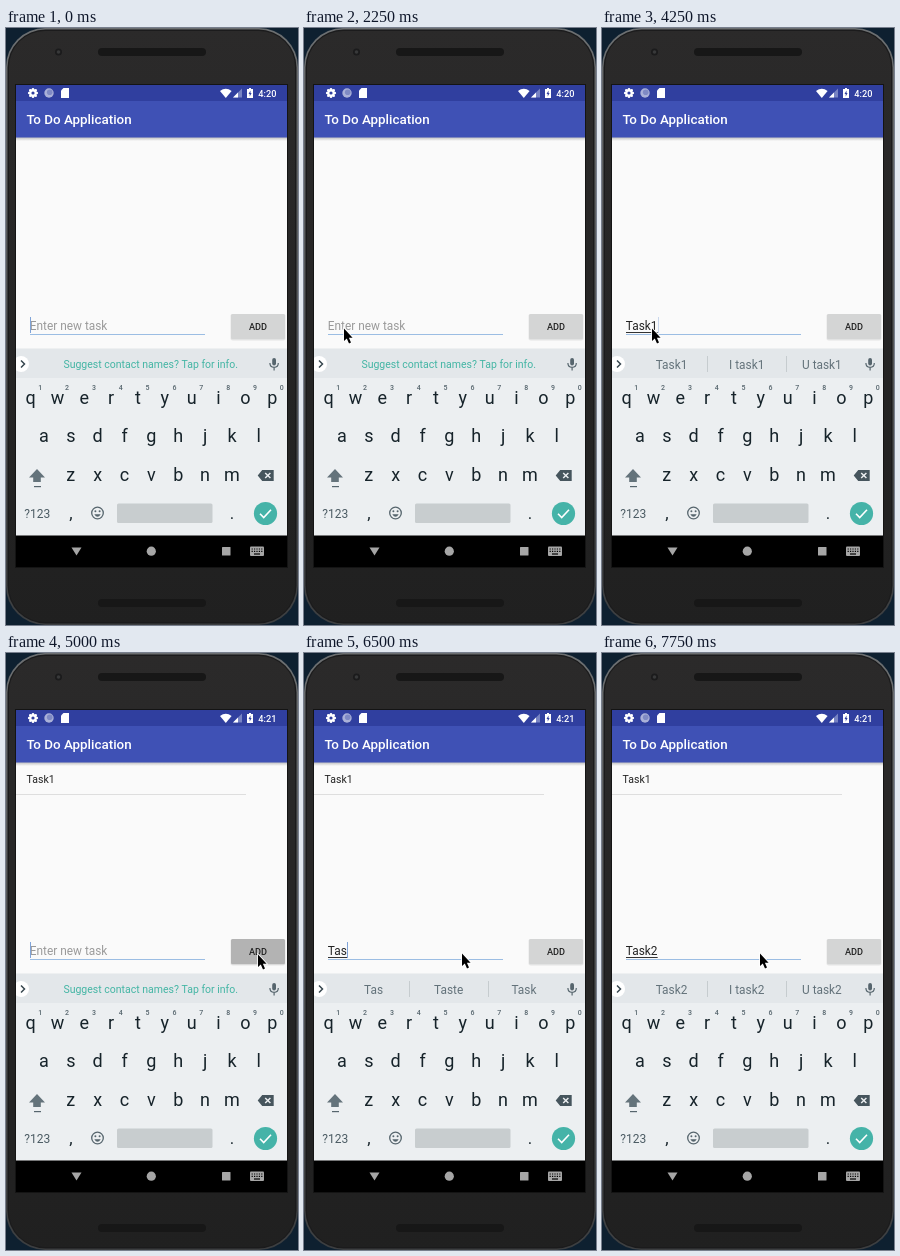
Recreate the animation shown at these times as an HTML page with a canvas. Size 292x597 px, loop 8 s.

```html
<!DOCTYPE html>
<html lang="en">
<head>
<meta charset="utf-8">
<title>To Do Application</title>
<style>
  html, body { margin: 0; width: 100%; height: 100%; overflow: hidden; background: #0e2030; }
  canvas { display: block; width: 100vw; height: 100vh; }
</style>
</head>
<body>
<canvas id="stage"></canvas>
<script>
const W = 292, H = 597, LOOP = 8000, TICK = 250;
const canvas = document.getElementById('stage');
const c = canvas.getContext('2d');

// Each entry holds from its time (ms) until the next one.
const typing = [
  [0, ''], [2750, 'T'], [3250, 'Ta', 'Table', 'Take'], [3500, 'Tas', 'Taste', 'Task'],
  [3750, 'Task', 'Tasks', 'Taste'], [4000, 'Task1', 'I task1', 'U task1'],
  [5000, ''], [6000, 'T'], [6250, 'Ta', 'Table', 'Take'], [6500, 'Tas', 'Taste', 'Task'],
  [7000, 'Task', 'Tasks', 'Taste'], [7250, 'Task2', 'I task2', 'U task2']
];
const pointer = [
  [0, null], [250, 268, 143], [500, 232, 176], [750, 160, 238], [1000, 78, 290], [1250, 39, 301],
  [1500, 39, 299], [4250, 49, 299], [4500, 160, 302], [4750, 251, 300], [5250, 248, 300], [5500, 157, 299]
];
const caretShown = [
  [0, 1], [250, 0], [750, 1], [1250, 0], [1750, 1], [2250, 0], [2750, 1], [4250, .4],
  [4500, 0], [5000, 1], [5500, 0], [6000, 1], [7750, 0]
];
const at = (track, t) => track.findLast(key => key[0] <= t).slice(1);

function rect(x, y, w, h, color, r = 0) {
  c.fillStyle = color;
  c.beginPath();
  c.roundRect(x, y, w, h, r);
  c.fill();
}
function disc(x, y, r, color) {
  c.fillStyle = color;
  c.beginPath();
  c.arc(x, y, r, 0, 7);
  c.fill();
}
function text(str, x, y, size, color, align = 'left', weight = 400) {
  c.font = `${weight} ${size}px Roboto, sans-serif`;
  c.textAlign = align;
  c.fillStyle = color;
  c.fillText(str, x, y);
}
function shape(d, x, y, fill, stroke, width = 1) {
  const path = new Path2D(d);
  c.save();
  c.translate(x, y);
  if (stroke) { c.strokeStyle = stroke; c.lineWidth = width; c.stroke(path); }
  if (fill) { c.fillStyle = fill; c.fill(path, 'evenodd'); }
  c.restore();
}
function fade(y0, y1, from, to) {
  const gradient = c.createLinearGradient(0, y0, 0, y1);
  gradient.addColorStop(0, from);
  gradient.addColorStop(1, to);
  return gradient;
}

function drawPhone() {
  rect(0, 0, W, H, '#0e2030');
  rect(0, 0, W, H, fade(0, H, '#6c6f71', '#3c3e40'), 39);
  rect(1.5, 1.5, 289, 594, '#1b1b1c', 38);
  rect(3, 3, 286, 591, fade(0, H, '#2b2a2a', '#202020'), 36);
  for (const y of [20, 571]) rect(92, y, 108, 8, '#171717', 4);
  disc(52.5, 24, 3.5, '#1b1b1c');
  disc(52.5, 24, 1.8, '#38393a');
  rect(9, 56, 273, 484, '#141414');
}

function drawStatusBar(clock) {
  rect(10, 57, 271, 16, '#303f9f');
  for (let i = 0; i < 8; i++) {
    const a = i * Math.PI / 4;
    disc(27 + 3.8 * Math.cos(a), 65 + 3.8 * Math.sin(a), 1.3, '#fff');
  }
  disc(27, 65, 3.8, '#fff');
  disc(27, 65, 1.6, '#303f9f');
  disc(43, 65, 4.7, '#aab1d8');
  disc(43.7, 64.3, 2.8, '#7f8ac4');
  shape('M2.5 0H8V10H0V2.5Z', 55, 60, '#fff');
  shape('M0 2.5Q5.8 -2 11.6 2.5L5.8 9.5Z', 214, 60.5, '#fff');
  shape('M9 0V9H0Z', 227, 60.5, '#7783c3');
  shape('M5 4V9H0Z', 227, 60.5, '#fff');
  shape('M2 0H4V1H6V10H0V1H2ZM3.5 2.5L1.5 6H2.7V8.5L4.6 5H3.5Z', 241, 60, '#fff');
  text(clock, 252.3, 68.6, 9.2, '#fff', 'left', 500);
}

function drawApp(added, pressed, typed, caret) {
  rect(10, 110, 271, 211, '#fafafa');
  rect(10, 109, 271, 4, fade(109, 113, '#bbb', '#fafafa'));
  rect(10, 73, 271, 36.5, '#3f51b5');
  text('To Do Application', 20.5, 96.3, 13.4, '#fff', 'left', 500);

  if (added) {
    text('Task1', 20.6, 129.6, 10.5, '#222');
    rect(10, 141, 230, 1, '#dedede');
  }

  rect(24, 306, 175, 1, '#9bbde3');
  text(typed || 'Enter new task', 23.8, 301.8, 11.86, typed ? '#222' : '#9a9a9a');
  const width = c.measureText(typed).width;
  rect(24, 304, width, 1, '#333');
  c.globalAlpha = caret;
  rect(24 + Math.round(width), 289, 1, 16, '#7fa3d8');
  c.globalAlpha = 1;

  rect(224.5, 286, 55, 26.5, '#e6e6e6', 2);
  rect(225, 286, 54, 25.3, pressed ? '#b3b3b3' : '#d4d5d5', 1.5);
  text('ADD', 252, 302, 9.2, '#222', 'center', 500);
}

function drawSuggestions(words) {
  rect(10, 320.5, 271, 30, '#e3e7ea');
  c.save();
  c.beginPath();
  c.rect(10, 320, 271, 31);
  c.clip();
  disc(15, 336, 8, '#fff');
  c.restore();
  shape('M0 0L3.5 3.5L0 7', 15, 332.5, null, '#37474f', 1.5);
  if (words.length > 1) {
    words.forEach((word, i) => text(word, 69.5 + i * 75.2, 340.7, 11.86, '#63727a', 'center'));
    rect(105, 328, 1, 16, '#c6cccf');
    rect(184, 328, 1, 16, '#c6cccf');
  } else {
    text('Suggest contact names? Tap for info.', 144.7, 340, 10.5, '#43b5a4', 'center');
  }
  rect(266.2, 330, 3.8, 7.4, '#56656d', 1.9);
  shape('M0 0Q0 4.3 4.2 4.3Q8.4 4.3 8.4 0M4.2 4.3V7.5', 263.9, 335, null, '#56656d', 1.2);
}

function drawKeyboard() {
  const ink = '#16232a', gray = '#56656d', step = 26.85;
  rect(10, 350, 271, 158, '#eceff1');
  [['qwertyuiop', 24.6, 375.5], ['asdfghjkl', 38, 414], ['zxcvbnm', 64.8, 453]].forEach(([row, x, y]) =>
    [...row].forEach((key, i) => text(key, x + i * step, y, 18, ink, 'center')));
  [...'1234567890'].forEach((digit, i) => text(digit, 34.2 + i * step, 361.8, 7, gray, 'center', 500));

  shape('M8 0L16 8.5H11.8V13H4.2V8.5H0Z', 23, 441, '#64737b');
  rect(28, 458, 7, 1.2, gray);
  shape('M4.5 0H16V11H4.5L0 5.5ZM7 3.4L9.1 5.5L7 7.6L8 8.6L10.1 6.5L12.2 8.6L13.2 7.6L11.1 5.5L13.2 3.4L12.2 2.4L10.1 4.5L8 2.4Z',
    251.7, 442, '#46555d');

  text('?123', 31.2, 489.8, 12, '#4a5a62', 'center');
  text(',', 65, 490.5, 17, ink, 'center');
  text('.', 226, 490.5, 17, ink, 'center');
  c.strokeStyle = gray;
  c.lineWidth = 1.3;
  c.beginPath();
  c.arc(91.5, 485, 5.8, 0, 7);
  c.stroke();
  disc(89.4, 483.3, 1, gray);
  disc(93.6, 483.3, 1, gray);
  shape('M0 0Q3.2 5 6.4 0Z', 88.3, 486.3, gray);
  rect(111, 475.5, 95.5, 19.5, '#c8cdcf', 1.5);
  disc(259.5, 485.5, 11.6, '#45b3a8');
  shape('M0 4L3.7 7.7L11 0', 254, 481.8, null, '#fff', 1.6);
}

function drawNavBar() {
  const gray = '#a6a6a6';
  rect(10, 507.5, 271, 31.5, '#000');
  shape('M0 0H10L5 8Z', 65.5, 519.5, gray);
  disc(145.3, 523.2, 4.6, gray);
  rect(216, 519, 8.5, 8.5, gray, .5);
  rect(244, 518.5, 14, 9.5, gray, 1);
  for (let i = 0; i < 5; i++)
    for (let j = 0; j < 2; j++) rect(245.6 + i * 2.4, 520.4 + j * 2.4, 1.2, 1.2, '#000');
  rect(248, 525.4, 6, 1.2, '#000');
}

function frame(now) {
  const t = Math.floor(now % LOOP / TICK) * TICK;
  const dpr = devicePixelRatio || 1;
  const w = Math.round(innerWidth * dpr), h = Math.round(innerHeight * dpr);
  if (canvas.width !== w || canvas.height !== h) { canvas.width = w; canvas.height = h; }
  c.setTransform(w / W, 0, 0, h / H, 0, 0);

  const words = at(typing, t);
  const [x, y] = at(pointer, t);
  const added = t >= 5000;
  drawPhone();
  drawStatusBar(added ? '4:21' : '4:20');
  drawApp(added, t === 5000, words[0], at(caretShown, t)[0]);
  drawSuggestions(words);
  drawKeyboard();
  drawNavBar();
  if (x !== null) shape('M1 1.5V14L3.8 11.5L6 16.5L8 15.6L5.9 10.8H9.6Z', x, y, '#000', '#fff', 1.6);
  requestAnimationFrame(frame);
}
requestAnimationFrame(frame);
</script>
</body>
</html>
```
